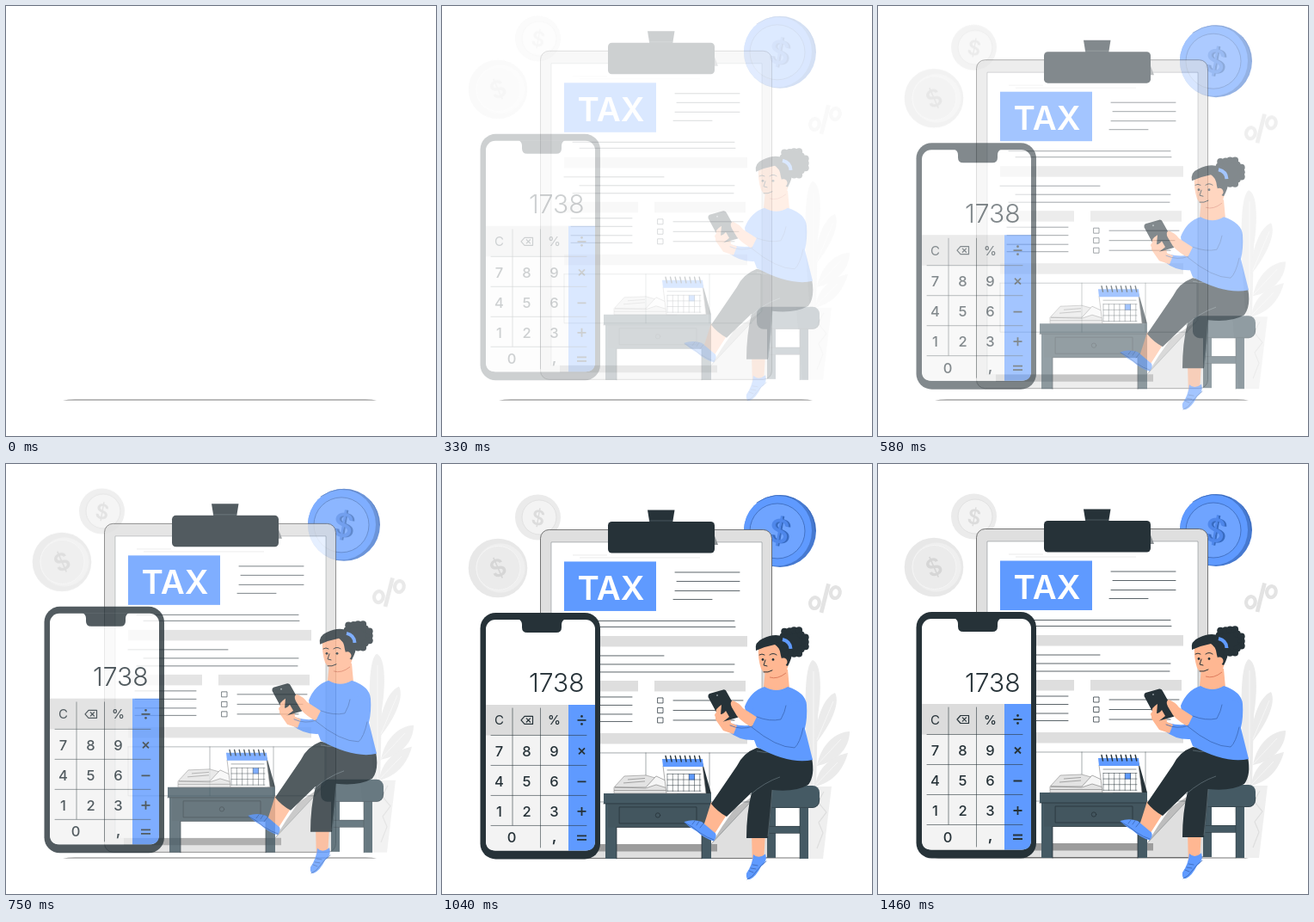
Write an HTML page that moves like this. It is 500 by 500 pixels and loops after 1.5 s.

```html
<!DOCTYPE html>
<html lang="en">
<head>
<meta charset="utf-8">
<title>Tax</title>
<style>
  html, body { margin: 0; width: 100%; height: 100%; overflow: hidden; background: #fff; }
  svg { display: block; width: 100vw; height: 100vh; }
  text { font-family: Inter, sans-serif; text-anchor: middle; }
  .dark { fill: #263238; }
  .steel { fill: #455a64; }
  .blue { fill: #5f9aff; }
  .skin { fill: #ffb792; }
  .line { fill: none; stroke: #263238; stroke-width: .75; stroke-linecap: round; stroke-linejoin: round; }
  .crease { fill: none; stroke: #3b67b4; stroke-width: .8; stroke-linecap: round; }
  .part { opacity: 0; }
</style>
</head>
<body>
<svg viewBox="0 0 500 500">
  <path d="M66 458.6Q72 457.6 80 457.6H418Q426 457.6 431 458.6Z" fill="#777"/>

  <g class="part">
    <circle cx="111.5" cy="61" r="26.5" fill="#ebebeb"/>
    <circle cx="113" cy="61" r="20" fill="#f3f3f3" stroke="#e2e2e2"/>
    <text x="112" y="70" font-size="24" font-weight="600" fill="#dcdcdc" transform="rotate(10 112 61)">$</text>
    <circle cx="65" cy="120" r="34.3" fill="#e8e8e8"/>
    <circle cx="68" cy="120" r="28.5" fill="#efefef"/>
    <circle cx="65.5" cy="120" r="25.5" fill="#ebebeb" stroke="#f5f5f5"/>
    <text x="65" y="130" font-size="28" font-weight="600" fill="#d6d6d6" transform="rotate(-24 65 120)">$</text>
    <g fill="none" stroke="#e3e3e3">
      <ellipse cx="433.5" cy="160.500" rx="5.300" ry="6.500" stroke-width="4.200" transform="rotate(12 433 160)"/>
      <ellipse cx="457.500" cy="148.500" rx="5.300" ry="6.500" stroke-width="4.200" transform="rotate(12 457 148)"/>
      <path d="M449.500 138.500 441 172" stroke-width="4.800"/>
    </g>
  </g>

  <g class="part">
    <circle cx="393" cy="77" r="42" fill="#4679d0"/>
    <ellipse cx="390.500" cy="76.500" rx="39.500" ry="41" class="blue"/>
    <circle cx="390" cy="77" r="32" fill="#6fa4ff" stroke="#3b67b4" stroke-width=".8"/>
    <path class="crease" d="M366 44Q388 29 411 40M424 49Q434 61 434 77"/>
    <text x="394" y="91" font-size="38" font-weight="600" fill="#386bc0" transform="rotate(10 394 77)">$</text>
    <text x="392" y="91" font-size="38" font-weight="500" fill="#4f87ea" transform="rotate(10 394 77)">$</text>
  </g>

  <g class="part">
    <g fill="#ebebeb">
      <path d="M431 227C441 230 442 262 437 292L435 376H428C424 330 417 236 431 227Z"/>
      <path d="M457 265C464 278 450 305 436 322L433 326C434 296 444 270 457 265Z"/>
      <path d="M474 310C474 330 458 346 436 350C440 326 458 310 474 310Z"/>
      <path d="M472 335C466 357 452 370 434 374C436 352 454 338 472 335Z"/>
    </g>
    <path d="M412 374H453L443 458H419Z" fill="#efefef"/>
    <path d="M432 240V374M436 349 464 319M434 373 460 346M436 320 455 275" fill="none" stroke="#f6f6f6"/>
    <path d="M444 380 437 392 447 404 438 416 443 428 436 446" fill="none" stroke="#dedede" stroke-width="1.200"/>
  </g>

  <g class="part" id="board">
    <rect x="114.500" y="75.500" width="269" height="382" rx="10" fill="#dfdfdf" stroke="#555" stroke-width=".8"/>
    <path d="M137 441H320V449.500H137Z" fill="#9c9c9c"/>
    <path d="M127 90H372V378L313 441H127Z" fill="#fff"/>
    <path d="M372 378 313 441Q326 419 340 400Z" fill="#bdbdbd"/>
    <path class="line" d="M127 441V90H372V378L313 441" stroke-opacity=".4"/>
    <path d="M316 80 321 93H317Z" fill="#8d9295"/>
    <path class="dark" d="M239 52.500H270.500L268 68H241.500Z"/>
    <path d="M241 65H268" stroke="#56656c" stroke-width=".7"/>
    <rect class="dark" x="193" y="66" width="124" height="36.500" rx="4.500"/>
    <path d="M152 105H192M160 108H300" stroke="#ddd" stroke-width=".6"/>
    <rect class="blue" x="142" y="112.500" width="107" height="57.500"/>
    <text x="196.500" y="157" font-size="38.500" font-weight="600" fill="#fff">TAX</text>
  </g>

  <g class="part" id="phone">
    <rect class="dark" x="44.500" y="172" width="139.500" height="286.500" rx="18"/>
    <rect x="51" y="180" width="127" height="268.500" rx="11" fill="#fff"/>
    <path class="dark" d="M89 179.500H143Q139 181 139 186V189Q139 195 133 195H99Q93 195 93 189V186Q93 181 89 179.500Z"/>
    <text x="165.500" y="264.500" font-size="30" font-weight="300" style="text-anchor:end" class="dark">1738</text>
    <path d="M51 279H147V448.500H62Q51 448.500 51 437.500Z" fill="#f3f3f3"/>
    <path d="M51 279H147V314.500H51Z" fill="#dcdcdc"/>
    <path class="blue" d="M147 279H178V437.500Q178 448.500 167 448.500H147Z"/>
    <path class="line" d="M57 314.500H168M57 349.500H168M57 384.500H168M57 419.500H168M82 283V419M114.500 283V445" stroke-opacity=".75"/>
    <path class="line" style="stroke-width:1.200" d="M92 297 96 292.500H105.500V301.500H96ZM98.300 294.900 102.500 299.100M102.500 294.900 98.300 299.100"/>
    <g fill="none" stroke="#263238" stroke-width="1.800">
      <path d="M157.500 297H167.500M159 329.500 166 336.500M166 329.500 159 336.500M157.500 368.500H167.500M157.500 403H167.500M162.500 398V408M157 431.500H168M157 436H168"/>
    </g>
    <circle class="dark" cx="162.500" cy="292.500" r="1.400"/><circle class="dark" cx="162.500" cy="301.500" r="1.400"/>
  </g>

  <g class="part">
    <path class="steel" d="M190 392H203V458H190ZM302 392H313V458H302Z"/>
    <path d="M193 393H313V421.500H193Z" fill="#43565f"/>
    <path class="steel" d="M188 382H313V394H188Z"/>
    <path class="line" d="M188 394H313M203 421.500H302M206.500 398H296V417H206.500ZM203 422V458M302 422V458"/>
    <circle class="line" cx="251" cy="407.500" r="2.700"/>
    <rect class="steel" x="378" y="390" width="10" height="67"/>
    <rect class="steel" x="416" y="390" width="10" height="68"/>
    <rect class="steel" x="381" y="420" width="40" height="8.500"/>
    <path class="line" d="M381 420.500H416M381 428.500H416M416 398V458" stroke-opacity=".6"/>
    <rect class="steel" x="366" y="373" width="73" height="26" rx="8"/>
    <path class="line" d="M384 398.500H432Q439 397 439 388" stroke-opacity=".6"/>
  </g>

  <g class="part" id="desk">
    <path d="M200 375 212 362 237 361 273 371V382H200Z" fill="#e3e3e3" stroke="#8a8a8a" stroke-width=".6"/>
    <path d="M201 375H237L249 362 273 373 262 376 249 372 237 376Z" fill="#f6f6f6" stroke="#777" stroke-width=".6"/>
    <path d="M211 370 236 368M216 366 236 364.500M200 378.500H272" stroke="#777" stroke-width=".6"/>
    <path class="dark" d="M302 343 313 382H304Z"/>
    <path d="M257 350H303L307 382H261Z" fill="#fff" stroke="#777" stroke-width=".6"/>
    <path class="blue" d="M256 342H303L304 351H257Z"/>
    <path class="blue" d="M287 359.500H294V366.500H287Z"/>
  </g>

  <g class="part" id="woman">
    <path class="skin" d="M313 392 331 407 315 432 302 426 307 411ZM360 428H376L374 462 361 468Z"/>
    <path class="blue" d="M281.500 415Q292 411.500 302 415L318 428.500Q320 432 316 437.500Q306 435 296 426Q287 421 281.500 415Z"/>
    <path class="crease" d="M282 416Q291 420 300 428 309 434 316 436M294 414 291 418M299 414.500 296 419M304 417 300 422"/>
    <path class="blue" d="M362 453Q368 459 376 452.500Q379 461 371 467 365 479 358 482 353 483 354 475 361 465 362 453Z"/>
    <path class="crease" d="M377 461Q371 465 366 472 361 480 355 482M361 465 367 466M359 469 365 470M357 472 362 474"/>
    <path class="dark" d="M366 329Q350 335 343 350L313 394Q320 403 331 409L360 381Q354 405 354 434H379Q383 404 384 378 410 381 426 372 434 361 430 341Z"/>
    <path d="M358 384Q375 369 393 363M384 378Q382 405 379 432M366 333Q376 336 385 333" fill="none" stroke="#68777e" stroke-width=".7"/>
    <path class="skin" d="M376 238H402L404 260Q390 269 374 258Z"/>
    <path class="blue" d="M375 258Q389 266 402 258 423 265 424 279 425 294 422 307L431 343Q405 349 366 328L361 315Q354 300 352 281 359 263 375 258Z"/>
    <path class="blue" d="M362 281 364 320Q346 321 333 310L337 301Q352 305 361 302Z"/>
    <path class="skin" d="M339 313 327 309 318 296Q317 287 325 279L330 287 333 283 336 300 343 303Z"/>
    <path class="dark" d="M311 266 327 261.500Q330 261 331 264L345.500 290Q346 293 343 294L327 298.500Q325 299 323.500 296L309.500 270Q309 267 311 266Z"/>
    <circle cx="320" cy="268" r="1" fill="#8b969b"/>
    <path class="skin" d="M325 279Q317 284 319 288 315 291 319 294 319 299 324 301L334 293 330 286Q327 290 324 290ZM338 274Q346 277 350 283L367 294 362 306Q350 300 343 292L337 282Q334 276 338 274Z"/>
    <path class="blue" d="M409 276Q425 272 423 292 421 318 413 327 398 332 360 305L366 293Q384 300 394 296 398 280 409 276Z"/>
    <path class="crease" d="M360 305Q389 329 410 329 416 324 420 306M366 293Q381 299 394 296 399 287 400 280M335 303Q348 309 361 304"/>
    <path class="skin" d="M368 211Q381 198 399 212L403 231Q400 247 391 247 377 248 371 237 367 225 368 211Z"/>
    <g class="dark" id="hair">
      <path d="M365 216Q363 206 373 202 391 193 404 204 412 216 402 234 396 232 394 222 393 212 387 209 376 211 365 216Z"/>
    </g>
    <circle class="skin" cx="397" cy="229" r="4.500"/>
    <path d="M396 203Q405 205 405.500 214" fill="none" stroke="#5f9aff" stroke-width="4"/>
    <path class="line" style="stroke-width:1" d="M369 221Q372 219 375 221M381 221Q385 218 389 221M376 227 374 233 378 234M374 241Q379 242 384 239"/>
    <circle class="dark" cx="373" cy="226.500" r="1.400"/><circle class="dark" cx="385" cy="226.500" r="1.400"/>
    <path d="M381 247Q390 250 400 242" fill="none" stroke="#de7d5e" stroke-width="1"/>
  </g>
</svg>
<script>
const SVG = 'http://www.w3.org/2000/svg';
const $ = id => document.getElementById(id);

function add(parent, tag, attrs, label) {
  const el = document.createElementNS(SVG, tag);
  for (const k in attrs) el.setAttribute(k, attrs[k]);
  if (label) el.textContent = label;
  return parent.appendChild(el);
}
const rule = (parent, x1, x2, y) => add(parent, 'path', { class: 'line', d: `M${x1} ${y}H${x2}` });

// Form
const board = $('board');
[[271, 346, 125], [273, 346, 135.5], [271, 346, 146.5], [269, 314, 156.5],
 [152, 340, 181.5], [160, 341, 188.5], [142, 258, 222], [160, 340, 232], [152, 339, 241]]
  .forEach(r => rule(board, ...r));
[[142, 355, 199], [142, 228, 251], [247, 353, 251], [142, 355, 312]].forEach(([x, end, y]) =>
  add(board, 'rect', { x, y, width: end - x, height: 12.5, fill: '#dedede' }));
[270, 279.5, 290, 298.5].forEach(y => rule(board, 150, 221, y));
[274, 285.5, 297].forEach((y, i) => {
  add(board, 'rect', { class: 'line', x: 251, y: y - 3, width: 6, height: 6 });
  rule(board, 269, 350 - i * 5, y);
});
add(board, 'path', { class: 'line', d: 'M142 335H371V378M142 335V392H360M237 335V392M311 335V392', 'stroke-opacity': .55 });

// Keypad
const phone = $('phone');
['C %', '789', '456', '123'].forEach((row, r) => [...row].forEach((key, c) =>
  add(phone, 'text', {
    x: 66.5 + c * 32, y: [302.5, 339, 374, 409][r],
    'font-size': r ? 16.5 : 15, 'font-weight': r || c ? 500 : 400, class: 'dark'
  }, key.trim())));
add(phone, 'text', { x: 81, y: 439.5, 'font-size': 16.5, 'font-weight': 500, class: 'dark' }, '0');
add(phone, 'text', { x: 130.5, y: 438, 'font-size': 18, 'font-weight': 600, class: 'dark' }, ',');

// Calendar
const desk = $('desk');
for (let i = 0; i < 8; i++)
  add(desk, 'path', { class: 'line', style: 'stroke-width:1.4', d: `M${260 + i * 5.6} 338.5l1.5 6.5` });
let grid = 'M262 355H300';
for (let i = 0; i < 4; i++) grid += `M262 ${359.5 + i * 6.6}H301`;
for (let i = 0; i < 7; i++) grid += `M${262 + i * 6.3} 359.5V379.5`;
add(desk, 'path', { class: 'line', d: grid, style: 'stroke-width:.5' });

// Curls of the bun
const hair = $('hair');
add(hair, 'circle', { cx: 408, cy: 206, r: 15 });
for (let i = 0; i < 17; i++) {
  const a = i * Math.PI * 2 / 17, d = 14 + Math.sin(i * 2.4) * 1.5;
  add(hair, 'circle', { cx: 408 + d * 1.05 * Math.cos(a), cy: 206 + d * Math.sin(a), r: 4 });
}

// Slide down with overshoot: cubic-bezier(.36, -.01, .5, 1.38)
const LOOP = 1500, STEPS = 36, DROP = 30;
const bezier = (a, b, s) => 3 * a * s * (1 - s) ** 2 + 3 * b * s * s * (1 - s) + s ** 3;

function ease(x) {
  let lo = 0, hi = 1;
  for (let i = 0; i < 30; i++) {
    const mid = (lo + hi) / 2;
    if (bezier(.36, .5, mid) < x) lo = mid; else hi = mid;
  }
  return bezier(-.01, 1.38, hi);
}

const parts = document.querySelectorAll('.part');
const start = performance.now();

function draw(now) {
  const t = Math.max(0, now - start) % LOOP;
  const step = Math.min(STEPS - 1, Math.floor((t + 4) * STEPS / LOOP));
  const p = ease((step + 1) / STEPS);
  for (const el of parts) {
    el.style.opacity = step < 4 ? 0 : Math.min(1, p);
    el.setAttribute('transform', `translate(0 ${(p - 1) * DROP})`);
  }
  requestAnimationFrame(draw);
}
draw(start);
</script>
</body>
</html>
```
